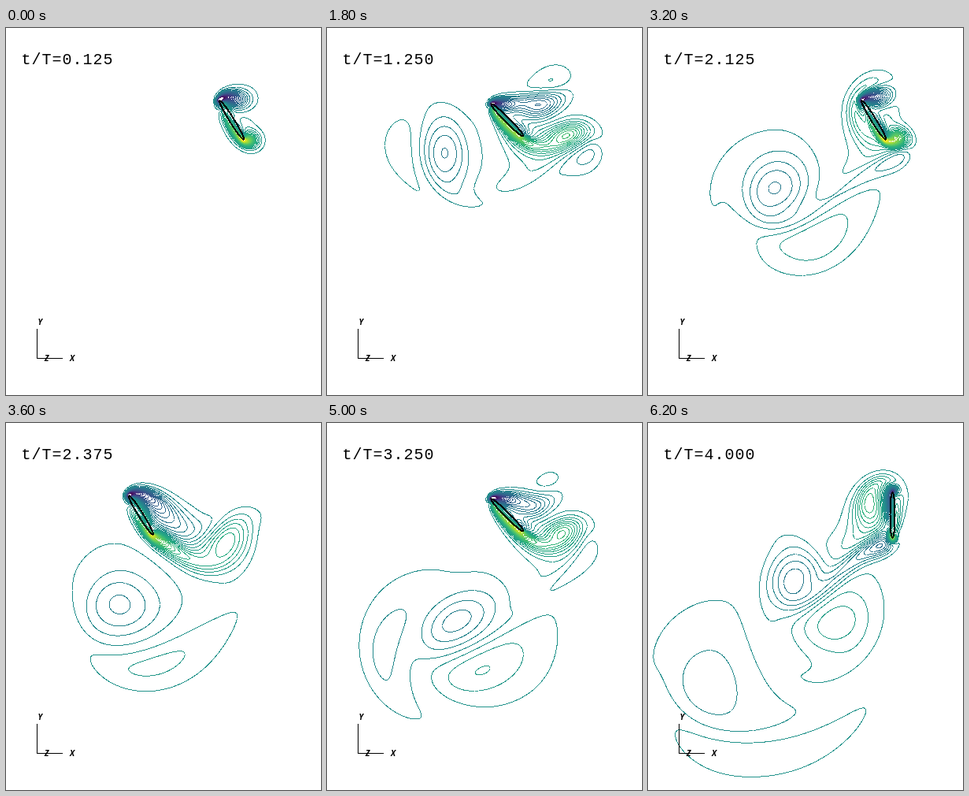
An HTML page that plays this animation: 400 px wide and 466 px high, repeating every 6.4 s.

```html
<!DOCTYPE html>
<html lang="en">
<head>
<meta charset="utf-8">
<title>Flapping wing vorticity</title>
<style>
  html, body { margin: 0; width: 100%; height: 100%; overflow: hidden; background: #fff; }
  svg { display: block; width: 100vw; height: 100vh; }
  #lines path { fill: none; stroke-width: 1; shape-rendering: crispEdges; }
  #wing { fill: none; stroke: #000; stroke-width: 2; shape-rendering: crispEdges; }
  #axes path { fill: none; stroke: #000; shape-rendering: crispEdges; }
  #axes text { font: italic bold 10px "Noto Sans", "Open Sans", sans-serif; }
  #clock { font: 20px "Liberation Mono", "Courier New", monospace; letter-spacing: 1px; }
</style>
</head>
<body>
<svg viewBox="0 0 400 466">
  <g id="lines"></g>
  <ellipse id="wing" rx="3" ry="29"/>
  <g id="axes">
    <path d="M39.5 382V419.5H72"/>
    <text x="40.5" y="377">Y</text>
    <text x="49" y="423">Z</text>
    <text x="81" y="423">X</text>
  </g>
  <text id="clock" x="19.5" y="45.5">t/T=0.125</text>
</svg>
<script>
// Flow around a flapping wing at Re 75, solved as vorticity and stream function.
// Lengths are in px, times in flapping periods, y points down.
const W = 192, H = 208, S = W + 1, h = 2.25, X0 = -24, Y0 = -8;
const FRAMES = 32, HOLD = 200, SUB = 80, dt = 1 / (8 * SUB);
const CX = 229, CY = 117, AMP = 81.5, R = 29, THICK = 3, TAU = 2 * Math.PI;
const SPEED = TAU * AMP, NU = SPEED * 2 * R / 75;
const SIZE = S * (H + 1), grid = (n = SIZE) => new Float64Array(n);

const w = grid(), u = grid(), v = grid(), w1 = grid(), ra = grid(), rb = grid(), fx = grid(), fy = grid();

function pose(t) {
  const c = Math.cos(TAU * t), s = Math.sin(TAU * t), a = Math.PI / 4 * s;
  return { x: CX + AMP * c, vx: -SPEED * s, a, spin: Math.PI / 4 * TAU * c, sin: Math.sin(a), cos: Math.cos(a) };
}

// Multigrid Poisson solver
const levels = [];
for (let a = W, b = H, d = h; a >= 12; a /= 2, b /= 2, d *= 2) {
  const n = (a + 1) * (b + 1);
  levels.push({ w: a, h: b, s: a + 1, d, p: grid(n), f: grid(n), r: grid(n) });
}
const psi = levels[0].p;

function relax({ w, h, s, d, p, f }, sweeps) {
  for (let n = 0; n < 2 * sweeps; n++)
    for (let j = 1; j < h; j++)
      for (let i = 1 + ((j + n) & 1), k = j * s + i; i < w; i += 2, k += 2)
        p[k] = 0.25 * (p[k - 1] + p[k + 1] + p[k - s] + p[k + s] - d * d * f[k]);
}

function restrict(src, s, out, { w, h, s: cs }) {
  for (let j = 1; j < h; j++)
    for (let i = 1; i < w; i++) {
      const k = 2 * j * s + 2 * i;
      out[j * cs + i] = (4 * src[k] + 2 * (src[k - 1] + src[k + 1] + src[k - s] + src[k + s]) +
        src[k - s - 1] + src[k - s + 1] + src[k + s - 1] + src[k + s + 1]) / 16;
    }
}

function cycle(n) {
  const L = levels[n], C = levels[n + 1];
  if (!C) return relax(L, 20);
  relax(L, 2);
  const { w, h, s, d, p, f, r } = L, q = C.p, cs = C.s;
  for (let j = 1; j < h; j++)
    for (let i = 1, k = j * s + 1; i < w; i++, k++)
      r[k] = f[k] - (p[k - 1] + p[k + 1] + p[k - s] + p[k + s] - 4 * p[k]) / (d * d);
  restrict(r, s, C.f, C);
  q.fill(0);
  cycle(n + 1);
  for (let j = 1; j < h; j++)
    for (let i = 1; i < w; i++) {
      const a = (j >> 1) * cs + (i >> 1), dx = i & 1, dy = (j & 1) * cs;
      p[j * s + i] += 0.25 * (q[a] + q[a + dx] + q[a + dy] + q[a + dx + dy]);
    }
  relax(L, 2);
}

// Open boundary: stream function of the lumped vorticity
function openEdges() {
  let src = w;
  for (let n = 1; n <= 3; n++) {
    restrict(src, levels[n - 1].s, levels[n].r, levels[n]);
    src = levels[n].r;
  }
  const { s, d } = levels[3], lumps = [];
  src.forEach((q, k) => {
    if (Math.abs(q) > 1e-4) lumps.push([(k % s) * d, Math.floor(k / s) * d, -q * d * d / (2 * TAU)]);
  });
  const far = k => {
    const x = (k % S) * h, y = Math.floor(k / S) * h;
    let sum = 0;
    for (const [a, b, g] of lumps) sum += g * Math.log((x - a) * (x - a) + (y - b) * (y - b));
    return sum;
  };
  const side = (k, step, n) => {
    let a = far(k);
    for (let m = 0; m < n; m += 4, k += 4 * step) {
      const b = far(k + 4 * step);
      for (let i = 0; i <= 4; i++) psi[k + i * step] = a + (b - a) * i / 4;
      a = b;
    }
  };
  side(0, 1, W); side(H * S, 1, W); side(0, S, H); side(W, S, H);
}

const limit = q => Math.max(-1200, Math.min(1200, q));
function velocity() {
  for (let j = 1; j < H; j++)
    for (let i = 1, k = j * S + 1; i < W; i++, k++) {
      u[k] = limit((psi[k + S] - psi[k - S]) / (2 * h));
      v[k] = limit((psi[k - 1] - psi[k + 1]) / (2 * h));
    }
}

// Sheet strengths on the chord that cancel a normal velocity error (sine series)
const K = 32, MODES = 10, sheet = grid(K * K), err = grid(K);
const chord = Array.from({ length: K }, (_, j) => (j + 0.5) * Math.PI / K);
for (let j = 0; j < K; j++)
  for (let m = 0; m < K; m++)
    for (let n = 1; n <= MODES; n++)
      sheet[j * K + m] -= 4 * R / (n * K) * Math.sin(chord[m]) * Math.sin(n * chord[m]) *
        (Math.sin(n * (j + 1) * Math.PI / K) - Math.sin(n * j * Math.PI / K));

function blockFlow(b) {
  const spots = chord.map((th, m) => {
    const s = -R * Math.cos(th);
    const gx = (b.x + s * b.sin - X0) / h, gy = (CY + s * b.cos - Y0) / h;
    const i = Math.floor(gx), j = Math.floor(gy), k = j * S + i, p = gx - i, q = gy - j;
    const near = [[k, (1 - p) * (1 - q)], [k + 1, p * (1 - q)], [k + S, (1 - p) * q], [k + S + 1, p * q]];
    let e = b.vx * b.cos + s * b.spin;
    for (const [n, a] of near) e -= a * (u[n] * b.cos - v[n] * b.sin);
    err[m] = e;
    return near;
  });
  spots.forEach((near, j) => {
    let g = 0;
    for (let m = 0; m < K; m++) g += sheet[j * K + m] * err[m];
    for (const [n, a] of near) w[n] += 0.6 * g * a / (h * h);
  });
}

function dragFlow(b) {
  fx.fill(0); fy.fill(0);
  const ci = Math.round((b.x - X0) / h), cj = Math.round((CY - Y0) / h), m = Math.ceil((R + 6) / h);
  for (let j = cj - m; j <= cj + m; j++)
    for (let i = ci - m; i <= ci + m; i++) {
      const dx = X0 + i * h - b.x, dy = Y0 + j * h - CY, k = j * S + i;
      const n = dx * b.cos - dy * b.sin, s = dx * b.sin + dy * b.cos, over = Math.abs(s) - R;
      const d = over > 0 ? Math.hypot(n, over) : Math.abs(n) - THICK * Math.sqrt(1 - s * s / (R * R));
      const solid = Math.max(0, Math.min(1, 0.25 - 0.7 * d / h));
      fx[k] = solid * (b.vx + s * b.spin * b.cos - u[k]);
      fy[k] = solid * (-s * b.spin * b.sin - v[k]);
    }
  for (let j = cj - m - 1; j <= cj + m + 1; j++)
    for (let i = ci - m - 1; i <= ci + m + 1; i++) {
      const k = j * S + i;
      w[k] += (fy[k + 1] - fy[k - 1] - fx[k + S] + fx[k - S]) / (2 * h);
    }
}

// Part of the grid that holds vorticity, always including the stroke of the wing
const box = { l: 60, r: 165, t: 30, b: 82 };
function growBox() {
  for (let j = 1; j < H; j++)
    for (let i = 1, k = j * S + 1; i < W; i++, k++)
      if (Math.abs(w[k]) > 1e-4) {
        box.l = Math.max(1, Math.min(box.l, i - 10));
        box.r = Math.min(W - 1, Math.max(box.r, i + 10));
        box.t = Math.max(1, Math.min(box.t, j - 10));
        box.b = Math.min(H - 1, Math.max(box.b, j + 10));
      }
}
function inBox(fn) {
  for (let j = box.t; j <= box.b; j++)
    for (let i = box.l, k = j * S + i; i <= box.r; i++, k++) fn(k);
}

// Third-order upwind transport plus diffusion
function flux(q, vel, out, k, s) {
  const c = (vel[k] + vel[k + s]) / 2;
  const f = c / (6 * h) * (c > 0 ? 2 * q[k + s] + 5 * q[k] - q[k - s] : 2 * q[k] + 5 * q[k + s] - q[k + 2 * s]);
  out[k] -= f;
  out[k + s] += f;
}
function rate(q, out) {
  out.fill(0);
  const c = NU / (h * h);
  for (let j = box.t; j <= box.b; j++)
    for (let i = box.l, k = j * S + i; i <= box.r; i++, k++) {
      out[k] += c * (q[k - 1] + q[k + 1] + q[k - S] + q[k + S] - 4 * q[k]);
      if (i < W - 1) flux(q, u, out, k, 1);
      if (j < H - 1) flux(q, v, out, k, S);
    }
}

const fields = [];
let step = 0;
function advance() {
  const b = pose(++step * dt), f = levels[0].f;
  if (step % 8 === 1) {
    openEdges();
    growBox();
  }
  for (let k = 0; k < SIZE; k++) f[k] = -w[k];
  cycle(0);
  velocity();
  blockFlow(b);
  dragFlow(b);
  rate(w, ra);
  inBox(k => { w1[k] = w[k] + dt * ra[k]; });
  rate(w1, rb);
  inBox(k => { w[k] += dt / 2 * (ra[k] + rb[k]); });
  if (step % SUB === 0) fields.push(Float32Array.from(w));
}

// Level spacing, set by the first vortex left behind on the left side
while (fields.length < 10) advance();
let peak = 0;
fields[9].forEach((q, k) => {
  const x = X0 + (k % S) * h, y = Y0 + Math.floor(k / S) * h;
  if (x < 185 && y > 85) peak = Math.max(peak, Math.abs(q));
});
const gap = peak / 4.6;

// Contour lines
const HALF = 25;
const viridis = ["440154", "472d7b", "3b528b", "2c728e", "21918c", "28ae80", "5ec962", "addc30", "fde725"]
  .map(c => [0, 2, 4].map(i => parseInt(c.slice(i, i + 2), 16)));
function colour(p) {
  const i = Math.min(7, Math.floor(p * 8)), f = p * 8 - i;
  return `rgb(${viridis[i].map((c, n) => Math.round(c + (viridis[i + 1][n] - c) * f))})`;
}
const el = id => document.getElementById(id);
const paths = Array.from({ length: 2 * HALF }, (_, m) => {
  const p = document.createElementNS("http://www.w3.org/2000/svg", "path");
  p.setAttribute("stroke", colour(m / (2 * HALF - 1)));
  return el("lines").appendChild(p);
});

function contours(field) {
  const q = field.map(n => -n / gap);
  const out = paths.map(() => []), r = n => Math.round(n * 100) / 100;
  for (let j = 0; j < H; j++)
    for (let i = 0; i < W; i++) {
      const k = j * S + i, a = q[k], b = q[k + 1], c = q[k + S + 1], e = q[k + S];
      const lo = Math.max(-HALF, Math.ceil(Math.min(a, b, c, e) - 0.5));
      const hi = Math.min(HALF - 1, Math.floor(Math.max(a, b, c, e) - 0.5));
      for (let m = lo; m <= hi; m++) {
        const z = m + 0.5, x = X0 + i * h, y = Y0 + j * h, pts = [];
        if (a > z !== b > z) pts.push(r(x + h * (z - a) / (b - a)) + " " + r(y));
        if (b > z !== c > z) pts.push(r(x + h) + " " + r(y + h * (z - b) / (c - b)));
        if (e > z !== c > z) pts.push(r(x + h * (z - e) / (c - e)) + " " + r(y + h));
        if (a > z !== e > z) pts.push(r(x) + " " + r(y + h * (z - a) / (e - a)));
        for (let n = 0; n + 1 < pts.length; n += 2) out[m + HALF].push("M" + pts[n] + "L" + pts[n + 1]);
      }
    }
  paths.forEach((p, m) => p.setAttribute("d", out[m].join("")));
}

let shown = -1;
function show(n) {
  while (fields.length <= n) advance();
  if (n === shown) return;
  shown = n;
  const t = (n + 1) / 8, b = pose(t);
  contours(fields[n]);
  el("wing").setAttribute("transform", `translate(${b.x} ${CY}) rotate(${-b.a * 360 / TAU})`);
  el("clock").textContent = "t/T=" + t.toFixed(3);
}

show(0);
const start = performance.now();
function tick() {
  const t = Math.max(0, performance.now() - start);
  show(Math.floor(t / HOLD) % FRAMES);
  // Work ahead a little so later frames are ready in time
  for (let n = 0; n < 8 && fields.length < FRAMES; n++) advance();
  requestAnimationFrame(tick);
}
requestAnimationFrame(tick);
</script>
</body>
</html>
```
